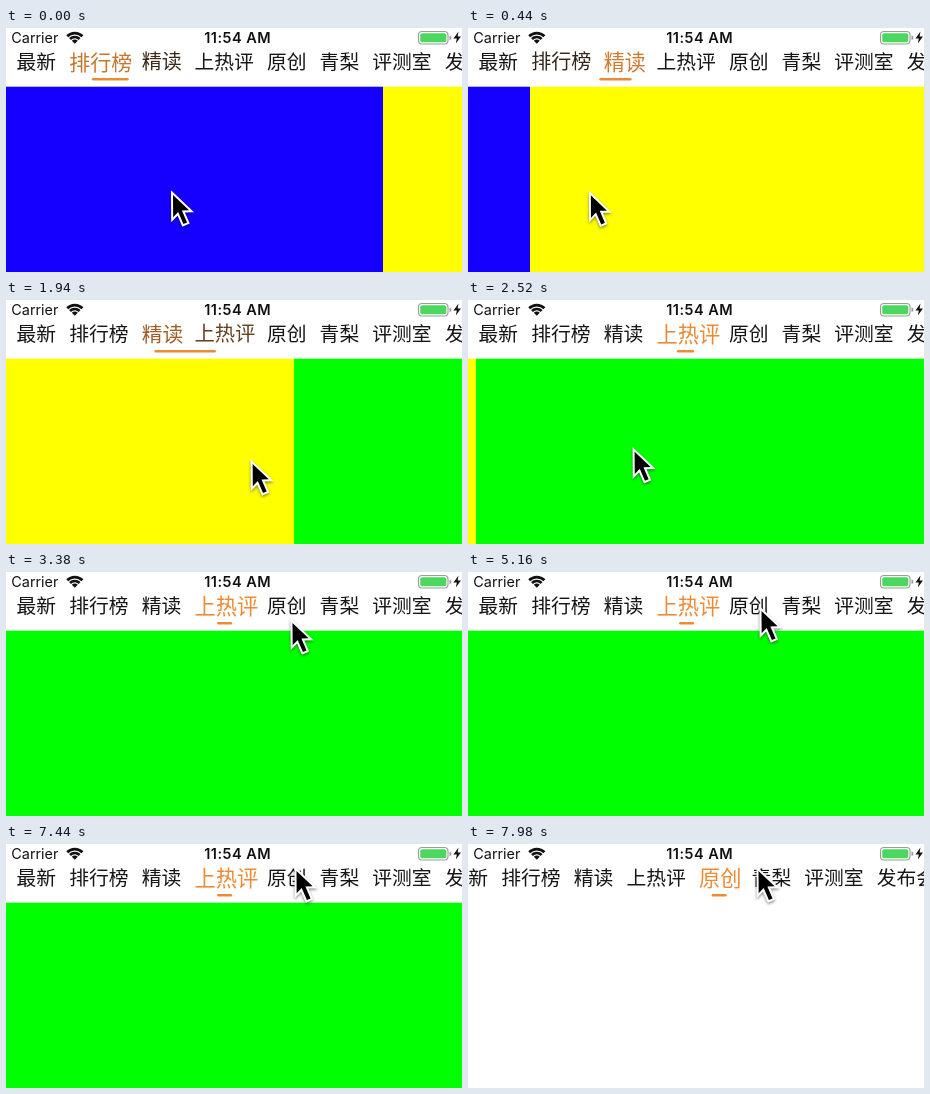
These frames come from a looping animation (456x244 px, 8000 ms). An HTML page with a canvas:

```html
<!DOCTYPE html>
<html lang="zh-CN">
<head>
<meta charset="utf-8">
<title>Tab pager</title>
<style>
html, body { margin: 0; width: 100%; height: 100%; overflow: hidden; background: #fff; }
canvas { display: block; width: 456px; height: 244px; }
</style>
</head>
<body>
<canvas id="stage" width="456" height="244"></canvas>
<script>
const ctx = document.getElementById('stage').getContext('2d');
const W = 456, H = 244, LOOP = 8000;
const DRAG_1 = 67, DRAG_2 = 1820, TAP = 7600;
const PAGE_TOP = 58.7;
const FONT_SIZE = 19.8, TAB_GAP = 13.1, BAR_WIDTH = 15;
const ORANGE = [238, 138, 52], INK = [22, 22, 22];
const PAGE_COLORS = ['', '#1500ff', '#ffff00', '#00ff00', '#ffffff'];

let nextX = 10.5;
const tabs = ['最新', '排行榜', '精读', '上热评', '原创', '青梨', '评测室', '发布会'].map(label => {
  const x = nextX, width = label.length * FONT_SIZE;
  nextX += width + TAB_GAP;
  return { label, x, mid: x + width / 2 };
});

const POINTER_START = { x: 165, y: 162 };
const POINTER_GLIDES = [
  { leave: 120, arrive: 260, x: 80, y: 163 },
  { leave: 300, arrive: 860, x: 338, y: 159 },
  { leave: 860, arrive: 1700, x: 406, y: 159 },
  { leave: 1700, arrive: 2110, x: 150, y: 159 },
  { leave: 2300, arrive: 3380, x: 284.5, y: 46 },
  { leave: 3640, arrive: 4460, x: 291.5, y: 34 },
  { leave: 5160, arrive: 6000, x: 288.5, y: 22 }
];

const clamp = v => Math.min(1, Math.max(0, v));
const lerp = (a, b, k) => a + (b - a) * k;
const progress = (t, from, to) => clamp((t - from) / (to - from));
const easeInOut = k => k * k * (3 - 2 * k);

function pointerAt(t) {
  return POINTER_GLIDES.reduce((at, glide) => {
    const k = easeInOut(progress(t, glide.leave, glide.arrive));
    return { x: lerp(at.x, glide.x, k), y: lerp(at.y, glide.y, k) };
  }, POINTER_START);
}

// Finger drag at constant speed, then a decaying settle onto the next page.
function swipe(elapsed) {
  const speed = 0.00288, start = 0.021, release = 180;
  if (elapsed <= release) return start + speed * Math.max(0, elapsed);
  const left = 1 - start - speed * release;
  const rest = left * Math.exp(-(elapsed - release) * speed / left);
  return rest < 0.004 ? 1 : 1 - rest;
}

function stateAt(t) {
  if (t >= TAP) {
    return {
      page: 4,
      tab: 3 + progress(t, TAP, TAP + 250),
      bar: 3 + progress(t, TAP, TAP + 333),
      scroll: 30 * easeInOut(progress(t, TAP, TAP + 340))
    };
  }
  let pos = 1 + swipe(Math.max(120, t) - DRAG_1);
  if (t > DRAG_2 - 120) pos = 2 + swipe(t - DRAG_2);
  return { page: pos, tab: pos, bar: pos, scroll: 0 };
}

function roundRect(x, y, w, h, r) {
  ctx.beginPath();
  ctx.roundRect(x, y, w, h, r);
}

function polygon(points) {
  ctx.beginPath();
  points.forEach(([x, y]) => ctx.lineTo(x, y));
  ctx.closePath();
}

function drawWifi(x, y) {
  for (let i = 0; i < 3; i++) {
    const outer = 4.2 + i * 3.95, inner = i ? outer - 2.7 : 0;
    ctx.beginPath();
    ctx.arc(x, y, outer, -Math.PI * 0.75, -Math.PI * 0.25);
    ctx.arc(x, y, inner, -Math.PI * 0.25, -Math.PI * 0.75, true);
    ctx.fill();
  }
}

function drawBattery(x, y) {
  ctx.strokeStyle = ctx.fillStyle = '#9c9c9c';
  ctx.lineWidth = 1.1;
  roundRect(x, y, 29.5, 12.5, 3.5);
  ctx.stroke();
  roundRect(x + 31, y + 4, 1.8, 4.5, [0, 2, 2, 0]);
  ctx.fill();
  ctx.fillStyle = '#4cd75f';
  roundRect(x + 1.7, y + 1.7, 26.1, 9.1, 2);
  ctx.fill();
}

function drawBolt(x, y) {
  const half = [[1.3, -6], [-3.7, 0.9], [-0.4, 0.9]];
  const points = [1, -1].flatMap(s => half.map(([dx, dy]) => [x + s * dx, y + s * dy]));
  ctx.fillStyle = '#111';
  polygon(points);
  ctx.fill();
}

function drawStatusBar() {
  ctx.fillStyle = '#111';
  ctx.font = '400 14.4px Inter, sans-serif';
  ctx.fillText('Carrier', 5.3, 15);
  drawWifi(68.8, 15.8);

  ctx.font = '600 14.5px Inter, sans-serif';
  ctx.letterSpacing = '0.5px';
  ctx.textAlign = 'center';
  ctx.fillText('11:54 AM', 231.7, 15);
  ctx.letterSpacing = '0px';
  ctx.textAlign = 'left';

  drawBattery(412.5, 3.5);
  drawBolt(451.2, 9.5);
}

function drawPages(page) {
  for (let i = Math.floor(page); i <= Math.ceil(page); i++) {
    ctx.fillStyle = PAGE_COLORS[i];
    ctx.fillRect(Math.round((i - page) * W), PAGE_TOP, W, H - PAGE_TOP);
  }
}

function drawBar(pos) {
  const from = Math.floor(pos), stretch = 2 * (pos - from);
  const a = tabs[from].mid, b = tabs[from + 1].mid;
  const left = lerp(a, b, clamp(stretch - 1)) - BAR_WIDTH / 2;
  const right = lerp(a, b, clamp(stretch)) + BAR_WIDTH / 2;
  ctx.fillStyle = `rgb(${ORANGE})`;
  roundRect(left + 0.5, 50, right - left, 2.5, 1.2);
  ctx.fill();
}

function drawTabs({ tab: active, bar, scroll }) {
  ctx.save();
  ctx.translate(-scroll, 0);
  tabs.forEach((tab, i) => {
    const rate = clamp(1 - Math.abs(active - i));
    const color = INK.map((c, n) => Math.round(lerp(c, ORANGE[n], rate)));
    const size = FONT_SIZE * (1 + 0.075 * rate);
    ctx.fillStyle = `rgb(${color})`;
    ctx.font = `400 ${size}px "Noto Sans CJK SC", "Noto Sans CJK", sans-serif`;
    ctx.fillText(tab.label, tab.x, 41 + rate);
  });
  drawBar(bar);
  ctx.restore();
}

// The arrow is mirrored about its own axis: [along, aside] for shoulder, neck and tail.
function drawPointer({ x, y }) {
  const side = [[20.5, 8.7], [17.7, 2], [30.8, 2]];
  const mirrored = side.map(([along, aside]) => [along, -aside]).reverse();
  ctx.save();
  ctx.translate(x + 2, y + 5);
  ctx.rotate(Math.PI * 0.37);
  polygon([[0, 0], ...side, ...mirrored]);
  ctx.lineWidth = 4;
  ctx.miterLimit = 4;
  ctx.strokeStyle = '#fff';
  ctx.shadowColor = 'rgba(0, 0, 0, 0.45)';
  ctx.shadowBlur = 3;
  ctx.shadowOffsetY = 1.5;
  ctx.stroke();
  ctx.shadowColor = 'transparent';
  ctx.fillStyle = '#000';
  ctx.fill();
  ctx.restore();
}

function render(t) {
  const state = stateAt(t);
  ctx.fillStyle = '#fff';
  ctx.fillRect(0, 0, W, H);
  drawPages(state.page);
  drawStatusBar();
  drawTabs(state);
  drawPointer(pointerAt(t));
}

const begin = performance.now();
function tick() {
  render((performance.now() - begin) % LOOP);
  requestAnimationFrame(tick);
}
tick();
</script>
</body>
</html>
```
